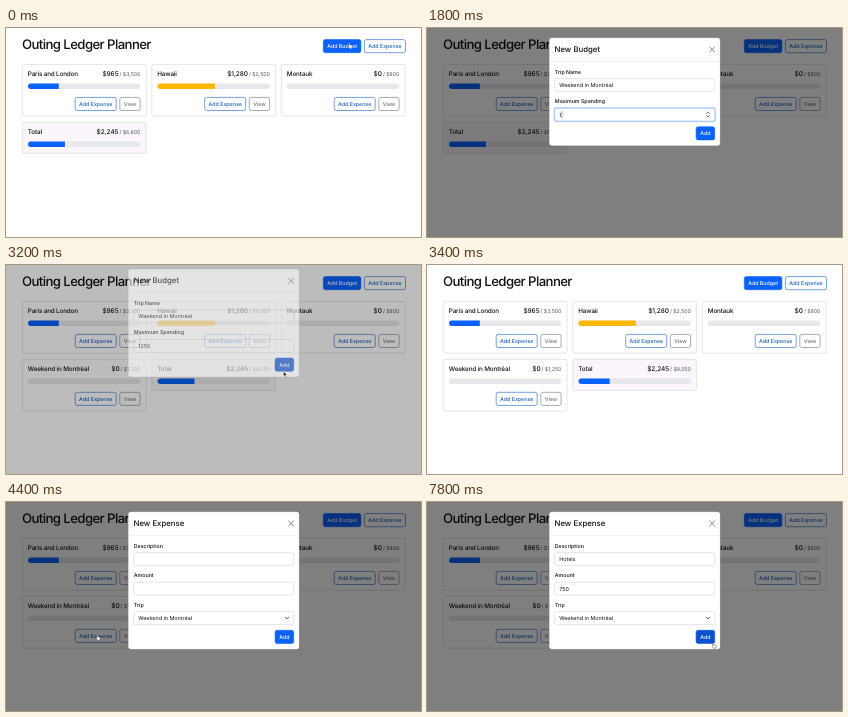
An HTML page that plays this animation: 415x209 px, repeating every 8000 ms.

```html
<!DOCTYPE html>
<html lang="en">
<head>
<meta charset="utf-8">
<title>Outing Ledger Planner</title>
<style>
  html, body { margin: 0; width: 100%; height: 100%; overflow: hidden; background: #fff; }
  svg { display: block; width: 100%; height: 100%; }
  text { font-family: Inter, "Noto Sans", sans-serif; font-size: 5.4px; fill: #111; text-rendering: geometricPrecision; white-space: pre; }
  .h1 { font-size: 13.2px; font-weight: 500; letter-spacing: -.045em; }
  .name { font-size: 6.35px; font-weight: 500; letter-spacing: -.025em; }
  .price { font-size: 6.5px; font-weight: 500; letter-spacing: -.01em; }
  .max { font-size: 5.2px; font-weight: 400; fill: #50555a; letter-spacing: 0; }
  .h4 { font-size: 7.8px; font-weight: 500; }
  .mid { text-anchor: middle; font-weight: 500; font-size: 5.3px; }
  .label { font-weight: 500; font-size: 5.3px; }
  .line { fill: none; stroke: #333; stroke-width: .8; stroke-linecap: round; stroke-linejoin: round; }
</style>
</head>
<body>
<svg id="stage" viewBox="0 0 415 209"></svg>
<script>
const LOOP = 8000, STEP = 200;
const BLUE = '#0a62fb', DARK = '#0a50cf', OUTLINE = '#1a62c4', YELLOW = '#ffb700', GRAY = '#6c757d';
const stage = document.getElementById('stage');

const ramp = (t, a, b) => Math.max(0, Math.min(1, (t - a) / (b - a)));
const money = n => '$' + n.toLocaleString('en-US');
const typed = (s, t, a, b) => s.slice(0, Math.round(s.length * ramp(t, a, b)));
const text = (x, y, s, cls = '', extra = '') => `<text x="${x}" y="${y}" class="${cls}" ${extra}>${s}</text>`;
const rect = (x, y, w, h, r, fill, extra = '') =>
  `<rect x="${x}" y="${y}" width="${w}" height="${h}" rx="${r}" fill="${fill}" ${extra}/>`;
const path = (d, extra = '') => `<path d="${d}" class="line" ${extra}/>`;

function button(x, y, w, label, color, solid) {
  return rect(x + .3, y + .3, w - .6, 13.1, 2, solid ? color : '#fff', `stroke="${color}" stroke-width=".6"`) +
    text(x + w / 2, y + 8.8, label, 'mid', `style="fill:${solid ? '#fff' : color}"`);
}

function card(col, row, name, amount, max, o = {}) {
  const x = 16 + col * 129.5, y = 36.4 + row * 57.9;
  const share = o.share ?? amount / max;
  const w = 112.5 * share, bx = x + 5.8, by = y + 19.1;
  const fill = w ? `<path d="M${bx + w} ${by}H${bx + 3}a2.75 2.75 0 0 0 0 5.5H${bx + w}z" fill="${o.color || BLUE}"/>` : '';
  return rect(x + .3, y, 123.8, o.total ? 31 : 51.8, 2, o.total ? '#faf6fb' : '#fff', 'stroke="#d3d3d5" stroke-width=".6"') +
    text(x + 5.8, y + 11.9, name, 'name') +
    text(x + 118.3, y + 11.9, `${money(amount)}<tspan class="max" dx="1">/ ${money(max)}</tspan>`, 'price', 'text-anchor="end"') +
    rect(bx, by, 112.5, 5.5, 2.75, '#e8e7ec') + fill +
    (o.total ? '' : button(x + 52.9, y + 32.7, 41.6, 'Add Expense', o.hover ? DARK : OUTLINE, o.hover) +
      button(x + 97.5, y + 32.7, 20.9, 'View', GRAY));
}

function page(t) {
  const saved = t >= 3200;
  return rect(0, 0, 415, 209, 0, '#fff') +
    text(16, 21.3, 'Outing Ledger Planner', 'h1') +
    button(317, 11.3, 38.2, 'Add Budget', BLUE, true) +
    button(358.1, 11.3, 41.7, 'Add Expense', OUTLINE) +
    card(0, 0, 'Paris and London', 965, 3500) +
    card(1, 0, 'Hawaii', 1280, 2500, { color: YELLOW }) +
    card(2, 0, 'Montauk', 0, 800) +
    (saved ? card(0, 1, 'Weekend in Montréal', 0, 1250, { hover: t >= 4000 && t < 4200 }) : '') +
    card(saved ? 1 : 0, 1, 'Total', 2245, saved ? 8050 : 6800,
      { total: true, share: t < 3400 ? 2245 / 6800 : 2245 / 8050 });
}

function field(i, label, value, focus, kind) {
  const y = 50.5 + i * 29.5;
  const caret = focus ? '<tspan dx="-.4" style="font-size:6.4px;font-weight:300">|</tspan>' : '';
  let s = text(127.8, y - 5, label, 'label');
  if (focus) s += rect(126.5, y - 1, 162.5, 15.3, 3, '#c2dbfe');
  s += rect(127.7, y + .2, 160.1, 12.9, 2, '#fff', `stroke="${focus ? '#86b7fe' : '#ced4da'}" stroke-width=".6"`) +
    text(132.2, y + 8.7, value + caret);
  if (kind === 'number' && focus) {
    s += rect(278.7, y + 2.6, 4.4, 8, 1.6, '#fff', 'stroke="#ccc" stroke-width=".4"') +
      path(`M279.8 ${y + 5.4}l1.1 -1.2 1.1 1.2M279.8 ${y + 7.8}l1.1 1.2 1.1 -1.2`);
  }
  if (kind === 'select') s += path(`M279.1 ${y + 5.7}l1.8 1.8 1.8 -1.8`);
  return s;
}

function dialog(title, fields, pressed, p) {
  const end = 50.5 + fields.length * 29.5;
  return rect(0, 0, 415, 209, 0, '#000', `opacity="${p / 2}"`) +
    `<g opacity="${Math.min(1, p * 1.15)}" transform="translate(0 ${-12 * (1 - p)})">` +
    rect(122.2, 9.8, 171, end - 1.5, 2.8, '#fff', 'stroke="#0003" stroke-width=".5"') +
    text(127.5, 24.2, title, 'h4') +
    path('M282.6 19l5 5m0 -5l-5 5', 'style="stroke:#666"') +
    rect(122.2, 33.3, 171, .5, 0, '#dee2e6') +
    fields.map((f, i) => field(i, ...f)).join('') +
    button(268.8, end - 11, 19.2, 'Add', pressed ? DARK : BLUE, true) + '</g>';
}

function modal(t) {
  if (t < 3400) {
    const p = ramp(t, 90, 300) - ramp(t, 3100, 3310);
    return p > 0 ? dialog('New Budget', [
      ['Trip Name', typed('Weekend in Montréal', t, 600, 1500), t >= 600 && t < 1600],
      ['Maximum Spending', typed('1250', t, 1600, 2400), t >= 1600 && t < 3000, 'number']
    ], t >= 3000, p) : '';
  }
  const p = ramp(t, 4090, 4300);
  return p > 0 ? dialog('New Expense', [
    ['Description', typed('Hotels', t, 5200, 6000), t >= 5200 && t < 6200],
    ['Amount', typed('750', t, 6200, 6800), t >= 6200 && t < 7800, 'number'],
    ['Trip', 'Weekend in Montréal', false, 'select']
  ], t >= 7600, p) : '';
}

// Pointer trips: start, end, from x, y, to x, y, visible until
const trips = [
  [200, 600, 342.5, 14.5, 170, 56, 700],
  [2500, 3000, 190, 90, 277.5, 106.5, 3300],
  [3500, 4000, 240, 116, 90.5, 132.5, 4700],
  [4700, 5200, 90.5, 132.5, 165, 57, 5300],
  [7000, 7600, 190, 90, 285.5, 140.5, 8000]
];

function pointer(t) {
  const trip = trips.find((m, i) => t >= (i ? m[0] : 0) && t < m[6]);
  if (!trip) return '';
  const [a, b, x0, y0, x1, y1] = trip;
  const k = ramp(t, a, b), e = k * k * (3 - 2 * k);
  const hand = t < 200 || (t >= 4000 && t < 4600) || t >= 7600;
  const d = hand
    ? 'M.4 .4q.7 -.6 1 .2v1.7l2 .5q.6 .3 .4 1.1l-.5 1.8h-2.3l-1.7 -2.2q.2 -.7 1.1 0z'
    : 'M0 0v4.7l1.1 -1 .8 1.8 .9 -.4 -.8 -1.7h1.5z';
  return `<path transform="translate(${x0 + (x1 - x0) * e} ${y0 + (y1 - y0) * e})" d="${d}" ` +
    `fill="${hand ? '#fff' : '#111'}" stroke="${hand ? '#222' : '#fff'}" stroke-width=".4"/>`;
}

let last = -1;
function frame(now) {
  const t = Math.floor(now % LOOP / STEP) * STEP;
  if (t !== last) stage.innerHTML = page(t) + modal(t) + pointer(t);
  last = t;
  requestAnimationFrame(frame);
}
frame(0);
</script>
</body>
</html>
```
